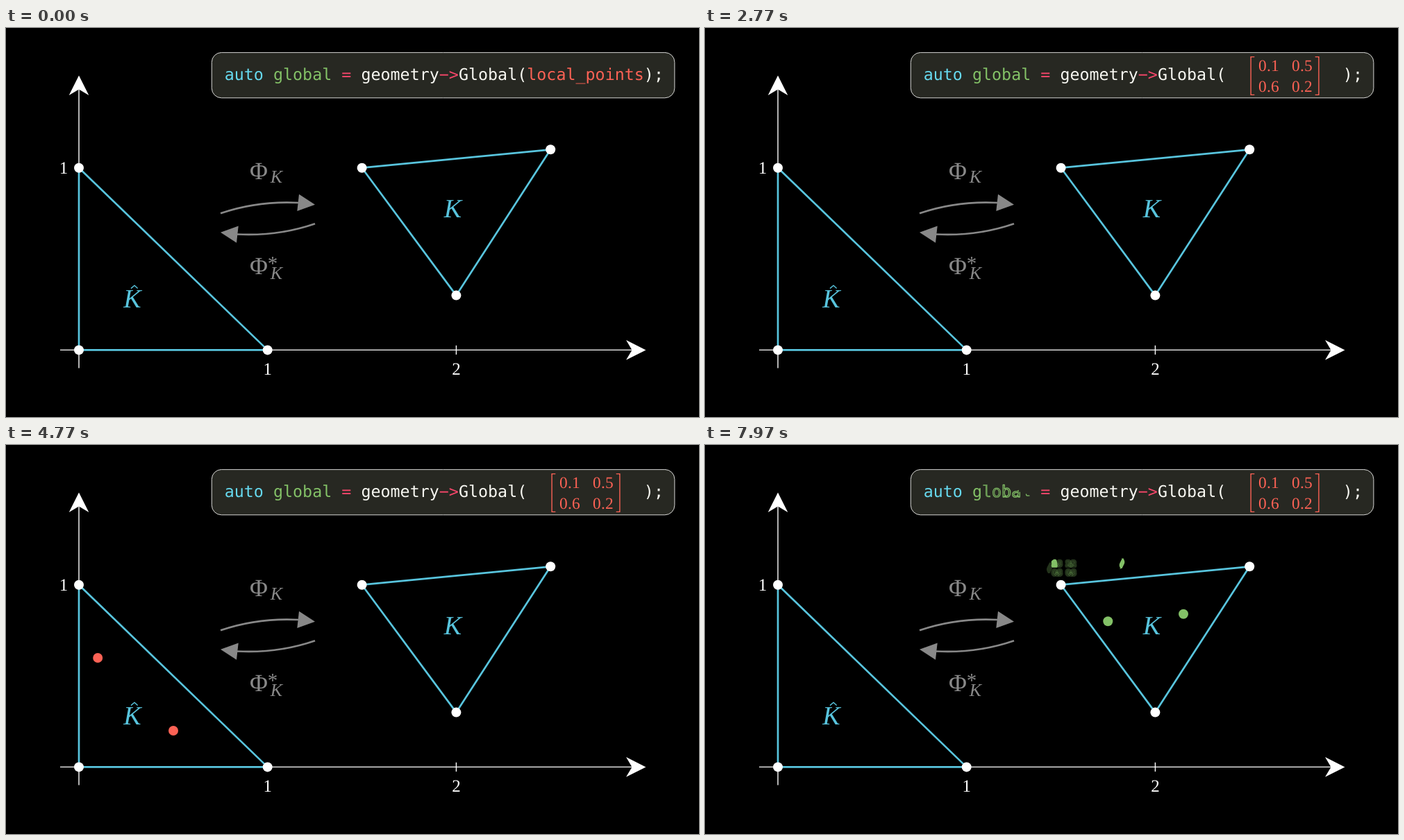
An HTML page with a canvas that plays this animation: 998 by 561 pixels, repeating every 8000 ms.

```html
<!DOCTYPE html>
<html lang="en">
<head>
<meta charset="utf-8">
<title>Mapping points between triangles</title>
<style>
html, body { margin: 0; width: 100%; height: 100%; overflow: hidden; background: #000; }
canvas { display: block; width: 998px; height: 561px; }
</style>
</head>
<body>
<canvas id="stage" width="998" height="561"></canvas>
<script>
const ctx = document.getElementById('stage').getContext('2d');
const LOOP = 8000, FPS = 30;
const RED = '#fc6255', GREEN = '#83c167', BLUE = '#58c4dd', GREY = '#888', WHITE = '#fff';
const MONO = '"DejaVu Sans Mono", monospace';
const SERIF = '"Liberation Serif", serif';

// Code line metrics
const CODE_X = 314.7, ADV = 14.05, CODE_SIZE = 23.3, CODE_MID = 67.1;
const NUM_SIZE = 23.4, DOT_R = 7;

const localDots = [[132.2, 307], [241, 412]];
const globalDots = [[580.3, 254.2], [689, 243.8]];

const mix = (a, b, k) => a + (b - a) * k;
const mixPt = (p, q, k) => [mix(p[0], q[0], k), mix(p[1], q[1], k)];
const clamp = v => Math.min(1, Math.max(0, v));
const sigmoid = x => 1 / (1 + Math.exp(-x));
const smooth = t => {
  const e = sigmoid(-5);
  return clamp((sigmoid(10 * (clamp(t) - 0.5)) - e) / (1 - 2 * e));
};

function mixColor(a, b, k) {
  const rgb = c => [1, 3, 5].map(i => parseInt(c.slice(i, i + 2), 16));
  const p = rgb(a), q = rgb(b);
  return `rgb(${p.map((v, i) => Math.round(mix(v, q[i], k)))})`;
}

// ---- drawing helpers ----
function paint(color, alpha = 1) {
  ctx.fillStyle = ctx.strokeStyle = color;
  ctx.globalAlpha = alpha;
}

function poly(points, close) {
  ctx.beginPath();
  points.forEach(p => ctx.lineTo(p[0], p[1]));
  if (close) ctx.closePath();
}

function line(points, width, close) {
  ctx.lineWidth = width;
  poly(points, close);
  ctx.stroke();
}

function area(points) {
  poly(points, true);
  ctx.fill();
}

function dot([x, y], r = DOT_R) {
  ctx.beginPath();
  ctx.arc(x, y, r, 0, 7);
  ctx.fill();
}

function label(str, x, y, size, font = SERIF, style = '') {
  ctx.font = `${style} ${size}px ${font}`;
  ctx.fillText(str, x, y);
}

// ---- matrices ----
function makeMatrix(cx, rows) {
  const glyphs = [];
  rows.forEach((row, r) => row.forEach((num, c) => {
    const x = cx + (c - 0.5) * 48 + 0.8;
    [...num].forEach((ch, i) => glyphs.push({ ch, at: [x + (i - 1) * 9, 54 + 30 * r] }));
  }));
  return { glyphs, left: [cx - 49.6, 69], right: [cx + 49.6, 69] };
}

const input = makeMatrix(835, [['0.1', '0.5'], ['0.6', '0.2']]);
const output = makeMatrix(427.5, [['1.8', '2.2'], ['0.8', '0.8']]);

function resample(points, n) {
  const next = i => points[(i + 1) % points.length];
  const lens = points.map((p, i) => Math.hypot(next(i)[0] - p[0], next(i)[1] - p[1]));
  const step = lens.reduce((a, b) => a + b) / n;
  const out = [];
  let i = 0, before = 0;
  for (let j = 0; j < n; j++) {
    while (j * step > before + lens[i]) before += lens[i++];
    out.push(mixPt(points[i], next(i), (j * step - before) / lens[i]));
  }
  return out;
}

// dir is the side the hooks point to
const bracketShape = dir => resample(
  [[0, -28], [6, -28], [6, -26.7], [1.4, -26.7], [1.4, 26.7], [6, 26.7], [6, 28], [0, 28]]
    .map(([x, y]) => [x * dir, y]), 160);
const LEFT = bracketShape(1), RIGHT = bracketShape(-1);

function bracket(shape, [x, y], sx = 1, sy = 1) {
  area(shape.map(p => [x + p[0] * sx, y + p[1] * sy]));
}

function digit(ch, [x, y], scale, spread = 0) {
  const size = NUM_SIZE * scale;
  if (size < 0.5) return;
  label(ch, x, y + 0.338 * size, size);
  if (spread > 0.02) {
    ctx.lineWidth = spread;
    ctx.strokeText(ch, x, y + 0.338 * size);
  }
}

function drawMatrix(m, color) {
  paint(color);
  m.glyphs.forEach(g => digit(g.ch, g.at, 1));
  bracket(LEFT, m.left);
  bracket(RIGHT, m.right);
}

// The outline turns half round on its way from circle to bracket
function bracketFromDot(shape, from, to, k) {
  const [x, y] = mixPt(from, to, k);
  area(shape.map((p, i) => {
    const a = 2 * Math.PI * i / shape.length;
    const q = mixPt([DOT_R * Math.sin(a), DOT_R * Math.cos(a)], p, k);
    return [x + q[0], y + q[1]];
  }));
}

// k = 0: two dots, k = 1: the whole matrix
function dotsToMatrix(m, [d1, d2], k, color) {
  const faint = k ** 1.5;
  m.glyphs.forEach((g, i) => {
    const at = mixPt(d1, g.at, k);
    paint(color, i ? faint : 1);
    digit(g.ch, at, k, 1.4 * DOT_R * (1 - k));
    if (!i) dot(at, DOT_R * (1 - k));
  });
  paint(color, faint);
  bracketFromDot(LEFT, d1, m.left, k);
  paint(color);
  bracketFromDot(RIGHT, d2, m.right, k);
}

// ---- code line ----
const letterX = i => CODE_X + ADV * (i + 0.5);

function letter(ch, [x, y], scale = 1) {
  const size = CODE_SIZE * scale;
  if (size >= 0.5) label(ch, x, y + 0.352 * size, size, MONO);
}

function code(str, start, color) {
  paint(color);
  [...str].forEach((ch, i) => letter(ch, [letterX(start + i), CODE_MID]));
}

function wordToMatrix(word, start, m, k) {
  const first = [letterX(start), CODE_MID];
  m.glyphs.forEach((g, i) => {
    paint(RED, i ? k : 1);
    digit(g.ch, mixPt(first, g.at, k), k);
  });
  [...word].forEach((ch, i) => {
    const from = [letterX(start + i), CODE_MID];
    const part = Math.floor(i / 4);
    const to = [m.glyphs[0].at, m.left, m.right][part];
    const at = mixPt(from, to, k);
    paint(RED, i % 4 ? 1 - k : 1);
    letter(ch, at, 1 - k);
    if (part) bracket(part === 1 ? LEFT : RIGHT, at, k, mix(0.3, 1, k));
    else if (i) digit(m.glyphs[0].ch, at, k);
  });
}

// Letters lose their fill, then their outline, from last to first
function unwrite(word, start, t) {
  const y = CODE_MID + 0.352 * CODE_SIZE;
  [...word].forEach((ch, i) => {
    const left = 1 - clamp(2 * t - 0.2 * (word.length - 1 - i));
    const fill = clamp(2 * left - 1);
    if (!left) return;
    paint(GREEN, fill);
    letter(ch, [letterX(start + i), CODE_MID]);
    if (left === 1) return;
    paint(GREEN);
    ctx.font = `${CODE_SIZE}px ${MONO}`;
    ctx.lineWidth = 1.3 * (1 - fill);
    if (left < 0.5) ctx.setLineDash([2 * left * (ch === 'l' ? 50 : 66), 999]);
    ctx.strokeText(ch, letterX(start + i), y);
    ctx.setLineDash([]);
  });
}

// ---- fixed scene ----
function mapArrow() {
  ctx.lineWidth = 2.7;
  ctx.beginPath();
  ctx.moveTo(309, 267.3);
  ctx.quadraticCurveTo(362, 249, 421, 252);
  ctx.stroke();
  area([[445, 254.7], [422, 239.8], [419.3, 264]]);
}

function axes() {
  paint(WHITE);
  line([[78, 464.4], [905, 464.4]], 1.4);
  line([[105, 490.5], [105, 85]], 1.4);
  line([[648.4, 457.8], [648.4, 471]], 1.4);
  area([[921.5, 464.4], [893, 450], [901.5, 464.4], [893, 478.8]]);
  area([[105, 68.5], [90.7, 97], [105, 88.5], [119.3, 97]]);
  label('1', 83, 210.3, 25);
  label('1', 376.7, 499.8, 25);
  label('2', 648.4, 499.8, 25);
}

function triangle(points) {
  paint(BLUE);
  line(points, 2.7, true);
  paint(WHITE);
  points.forEach(p => dot(p));
}

function mapLabels() {
  paint(GREY);
  mapArrow();
  ctx.save();
  ctx.translate(754, 549.5);
  ctx.rotate(Math.PI);
  mapArrow();
  ctx.restore();
  label('Φ', 364, 218, 35.5);
  label('K', 389.5, 222.8, 26, SERIF, 'italic');
  label('Φ', 364, 355.3, 35.5);
  label('K', 389.5, 362.3, 26, SERIF, 'italic');
  label('*', 384, 349, 29);
}

function scene() {
  paint('#000');
  ctx.fillRect(0, 0, 998, 561);
  axes();
  triangle([[105, 201.7], [105, 464.4], [376.7, 464.4]]);
  triangle([[512.6, 201.7], [784.2, 175.3], [648.4, 385.6]]);
  mapLabels();
  paint(BLUE);
  label('K', 643.5, 272.5, 38, SERIF, 'italic');
  label('K', 182, 403, 38, SERIF, 'italic');
  line([[180, 375.6], [185, 371.3], [189.6, 375.6]], 1.4);

  ctx.beginPath();
  ctx.roundRect(296.3, 35.4, 666.6, 65.4, 14);
  paint('#272822');
  ctx.fill();
  paint('#d8d8d6');
  ctx.lineWidth = 1;
  ctx.stroke();
  code('auto', 0, '#66d9ef');
  code('=', 12, '#f5466a');
  code('geometry', 14, '#f8f8f2');
  code('−>', 22, '#f5466a');
  code('Global(', 24, '#f8f8f2');
  code(');', 43, '#f8f8f2');
}

// ---- timeline, in seconds ----
function draw(t) {
  scene();

  if (t < 1.5) code('local_points', 31, RED);
  else if (t < 2.5) wordToMatrix('local_points', 31, input, smooth(t - 1.5));
  else drawMatrix(input, RED);

  if (t >= 3.5 && t < 4.5) {
    dotsToMatrix(input, localDots, 1 - smooth(t - 3.5), RED);
  } else if (t >= 4.5) {
    const k = smooth(t - 5.5);
    paint(mixColor(RED, GREEN, k));
    localDots.forEach((p, i) => dot(mixPt(p, globalDots[i], k)));
  }

  if (t < 7.5) code('global', 5, GREEN);
  else {
    unwrite('global', 5, t - 7.5);
    dotsToMatrix(output, globalDots, smooth(t - 7.5), GREEN);
  }
}

ctx.textAlign = 'center';
ctx.lineJoin = 'round';
ctx.textRendering = 'geometricPrecision';

function tick() {
  // Steps of 1/30 s, switched on the nearest 10 ms
  const ms = performance.now() % LOOP + 5;
  draw(Math.floor(ms * FPS / 1000) / FPS);
  requestAnimationFrame(tick);
}
tick();
</script>
</body>
</html>
```
